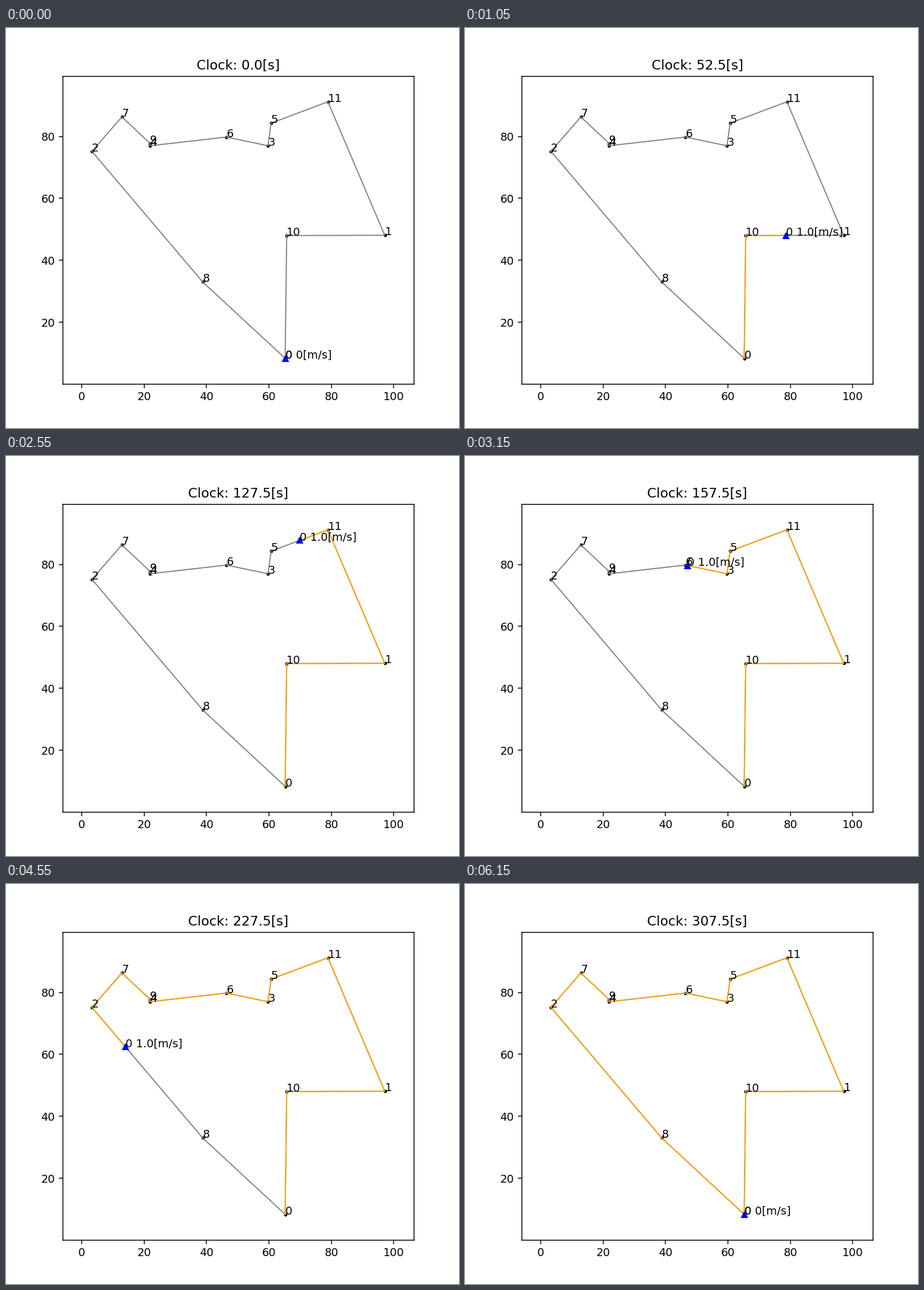
These frames come from a looping animation (796x703 px, 6200 ms). A matplotlib script:

```python
import numpy as np
import matplotlib.pyplot as plt
from matplotlib.animation import FuncAnimation

DPI = 140
FRAMES, INTERVAL = 124, 50
STEP = 2.5    # simulated seconds per frame
SPEED = 1.0   # metres per second

# Key points of the tour in visiting order
stops = {
    0: (65.2, 8.35), 10: (65.7, 48), 1: (97.1, 48.1), 11: (78.9, 91.2),
    5: (60.7, 84.3), 3: (59.7, 77), 6: (46.4, 79.8), 4: (21.9, 77),
    9: (21.9, 77.8), 7: (12.9, 86.3), 2: (3.3, 75.2), 8: (38.8, 33),
}
route = np.array([*stops.values(), stops[0]])
legs = np.hypot(*np.diff(route, axis=0).T)
reach = np.concatenate([[0], np.cumsum(legs)])

plt.rcParams["font.family"] = "DejaVu Sans"
fig, ax = plt.subplots(figsize=(796 / DPI, 703 / DPI), dpi=DPI)
fig.subplots_adjust(right=0.9007, top=0.8797)


def padded(values, pad=0.1):
    lo, hi = values.min(), values.max()
    return lo - pad * (hi - lo), hi + pad * (hi - lo)


ax.set_xticks(range(0, 101, 20))
ax.set_yticks(range(20, 81, 20))
ax.set_xlim(*padded(route[:, 0]))
ax.set_ylim(*padded(route[:, 1]))

for name, (x, y) in stops.items():
    ax.plot(x, y, "k.", ms=4)
    ax.text(x, y, str(name))

ax.plot(*route.T, color="gray", lw=1)
trail, = ax.plot([], [], color="orange", lw=1)
vehicle, = ax.plot([], [], "b^", ms=5)
tag = ax.text(*route[0], "")
title = ax.set_title("")


def update(frame):
    clock = frame * STEP
    dist = min(clock * SPEED, reach[-1])
    pos = np.array([np.interp(dist, reach, axis) for axis in route.T])
    moving = 0 < dist < reach[-1]

    path = np.vstack([route[reach <= dist], pos])
    trail.set_data(*path.T)
    vehicle.set_data(pos[:1], pos[1:])
    tag.set_position(pos)
    tag.set_text(f"0 {SPEED if moving else 0}[m/s]")
    title.set_text(f"Clock: {clock:.1f}[s]")
    return trail, vehicle, tag, title


anim = FuncAnimation(fig, update, frames=FRAMES, interval=INTERVAL,
                     repeat=True, repeat_delay=0, blit=False)
plt.show()
```
